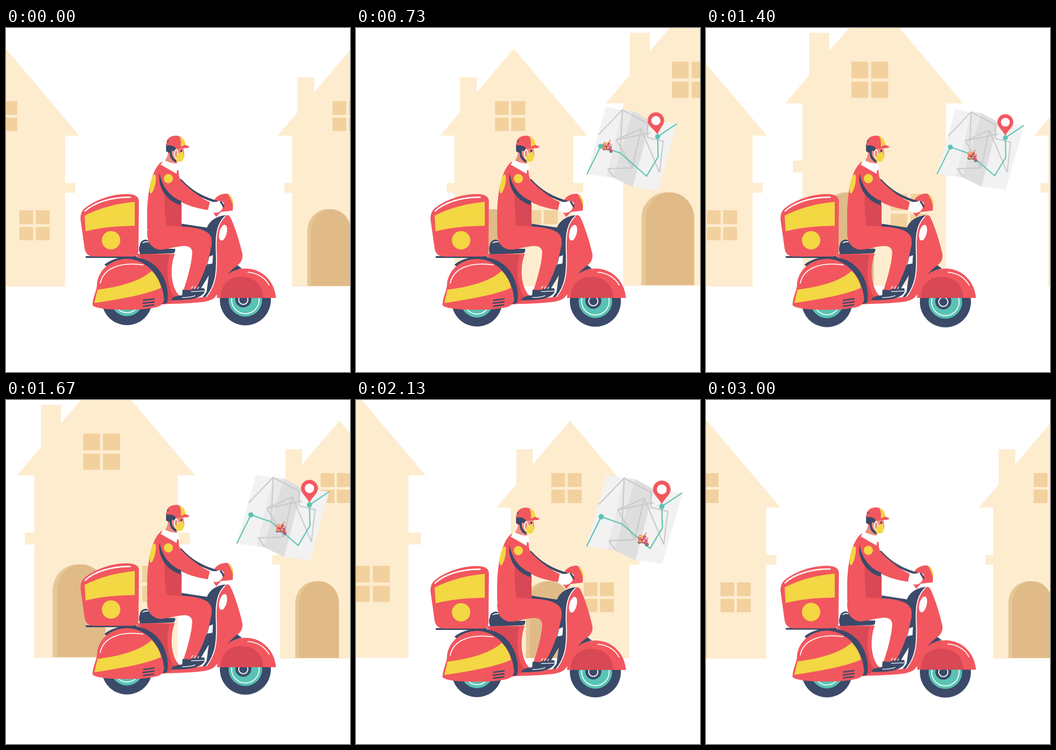
An HTML page without scripts for the animation above (3030 ms loop, 748 px wide and 748 px high).

```html
<!DOCTYPE html>
<html lang="en">
<head>
<meta charset="utf-8">
<title>Delivery rider</title>
<style>
  html, body { margin: 0; width: 100%; height: 100%; overflow: hidden; background: #fff; }
  svg { display: block; width: 100vw; height: 100vh; }

  .red { fill: #f2575f; }
  .deep { fill: #d94855; }
  .yellow { fill: #f3d743; }
  .navy { fill: #3b4a69; }
  .teal { fill: #58c3b4; }
  .skin { fill: #f08b80; }
  .white { fill: #fff; }
  .wall { fill: #feeccf; }
  .pane { fill: #f2d19e; }
  .line { fill: none; stroke: #fff; stroke-width: 2; stroke-linecap: round; }
  .bold { stroke-width: 3; }
  .thin { stroke-width: 1.6; }
  .ink { fill: none; stroke: #3b4a69; stroke-linecap: round; }
  .road { fill: none; stroke: #c9c9ca; stroke-width: 2.4; }
  .route { fill: none; stroke: #58c3b4; stroke-width: 2.4; }

  .street, .ride, .shake, .map, .pin, .courier {
    animation: 3030ms -5ms linear infinite;
  }
  .street { animation-name: street; }
  .ride { animation-name: bump; }
  .shake { animation-name: shake; }
  .map { animation-name: pulse; animation-timing-function: ease-in-out; transform-origin: 514px 308px; }
  .pin { animation-name: sway; transform-origin: 656px 232px; }
  .courier { animation-name: deliver; }

  @keyframes street {
    0% { transform: translateX(0); animation-timing-function: steps(89); }
    97.9%, 100% { transform: translateX(-1650px); }
  }
  @keyframes bump {
    0%, 33% { transform: translateY(0); }
    37.4% { transform: translateY(-.7px); }
    41%, 50% { transform: translateY(0); }
    54.5%, 55.5% { transform: translateY(-6px); }
    60%, 95% { transform: translateY(0); }
    100% { transform: translateY(-.7px); }
  }
  @keyframes shake {
    0% { transform: translateY(0); }
    9% { transform: translateY(2px); }
    16% { transform: translateY(0); }
    24.2% { transform: translateY(3px); }
    29% { transform: translateY(6px); }
    33% { transform: translateY(3px); }
    37.4% { transform: translateY(6px); }
    43% { transform: translateY(1px); }
    48% { transform: translateY(6px); }
    55% { transform: translateY(0); }
    62% { transform: translateY(6px); }
    70.4% { transform: translateY(0); }
    77% { transform: translateY(6px); }
    83.6% { transform: translateY(2px); }
    91% { transform: translateY(5px); }
    99% { transform: translateY(1.5px); }
    100% { transform: translateY(0); }
  }
  @keyframes pulse {
    0%, 13.2% { transform: scale(0); }
    17.6% { transform: scale(1.06); }
    24.2% { transform: scale(1); animation-timing-function: ease-out; }
    38% { transform: scale(.905); }
    55% { transform: scale(1.025); animation-timing-function: ease-out; }
    66% { transform: scale(1.07); animation-timing-function: ease-in; }
    70.4% { transform: scale(1.063); }
    83.6% { transform: scale(.925); }
    92.4% { transform: scale(.93); }
    96.8%, 100% { transform: scale(0); }
  }
  @keyframes sway {
    0%, 18% { transform: rotate(0); }
    24.2% { transform: rotate(-7deg); }
    30%, 100% { transform: rotate(0); }
  }
  @keyframes deliver {
    0%, 13.2% { transform: translate(535px, 250px); }
    24.2% { transform: translate(549px, 256px); }
    37.4% { transform: translate(569px, 267px); }
    55% { transform: translate(598px, 284px); }
    70.4% { transform: translate(620px, 302px); }
    83.6% { transform: translate(631px, 317px); }
    96.8%, 100% { transform: translate(645px, 294px); }
  }
</style>
</head>
<body>
<svg viewBox="0 0 748 748">
  <defs>
    <g id="window" class="pane">
      <path d="M0 0h30v30h-30zM35.500 0h30.500v30h-30.500zM0 36h30v29h-30zM35.500 36h30.500v29h-30.500z"/>
    </g>

    <!-- x = 0 is the roof ridge -->
    <g id="house">
      <path class="wall" d="M0 45L160 234H129V337H151V358H129V562H-129V358H-146V337H-129V234H-160L-117 183V107H-81V140Z"/>
      <use href="#window" x="-41" y="159"/>
      <use href="#window" x="29.500" y="396.500"/>
      <path fill="#e5c896" d="M-96 561V441A45 47 0 0 1 -51 394H-45V561Z"/>
      <path fill="#e0bb88" d="M-88 561V441A43.500 47 0 0 1 -1 441V561Z"/>
    </g>

    <g id="wheels">
      <circle class="navy" cx="263" cy="591" r="55"/>
      <circle class="teal" cx="263" cy="591" r="35.500"/>
      <circle class="line" cx="263" cy="591" r="28"/>
      <circle class="navy" cx="520.500" cy="591" r="55.500"/>
      <circle class="teal" cx="520.500" cy="591" r="36.500"/>
      <circle class="line" cx="520.500" cy="591" r="30"/>
      <circle class="navy" cx="516" cy="590" r="17.500"/>
      <circle class="line" cx="516" cy="591" r="10"/>
    </g>

    <g id="rider">
      <!-- frame behind the legs -->
      <path class="navy" d="M378 425L437 434C444 417 460 409 477 407L462 440L460 545C454 575 446 590 430 592L424 590L436 574L441 538L424 566L406 566L437 514L447 470L430 446L378 434Z"/>
      <path class="white" d="M442 497L450 494L449 512L438 514Z"/>
      <path class="navy" d="M476 545Q488 520 502 515L513 523Q490 527 476 545Z"/>

      <!-- floor and seat base -->
      <path class="red" d="M283 491H367C356 520 358 560 375 580C385 590 410 588 436 584L456 584Q446 594 425 596C390 600 360 599 325 602Z"/>
      <path class="deep" d="M290 493H356C346 525 352 568 366 585Q360 598 345 598Z"/>
      <path class="navy" d="M214 515C235 494 290 491 318 512C346 533 356 570 350 598L334 602Z"/>

      <!-- rear cowl -->
      <path class="red" d="M188 602C190 580 198 572 198 555C202 525 228 503 262 502C305 502 340 540 344 590Q343 600 333 605C310 614 250 614 218 611Q190 608 188 602Z"/>
      <path class="yellow" d="M199 569C245 563 290 552 317 528Q334 546 337 565C305 580 240 591 192 598Z"/>
      <path class="line" d="M205 555C211 524 245 508 298 515"/>
      <path class="ink" stroke-width="2.800" d="M299 592L322 589M298 598.500L322 595.500M299 605L321 602"/>

      <!-- seat -->
      <path class="navy" d="M291 472Q293 460 306 460L332 480H368Q369 490 361 490L292 492Q287 482 291 472Z"/>
      <path class="line" d="M298 467Q303 464 309 465"/>

      <!-- box -->
      <path class="ink" stroke-width="4" d="M175 498H283"/>
      <path class="red" d="M162 416Q161 402 170 393C195 372 233 361 262 361Q288 361 289 376L288 485Q287 497 275 497H190Q174 496 171 480Z"/>
      <path class="yellow" d="M171 408C205 390 245 381 280 378V430C240 431 210 433 173 442Z"/>
      <circle class="yellow" cx="228.500" cy="461.500" r="20"/>
      <path class="line bold" d="M172 398C192 379 232 367 270 368"/>

      <!-- front shield and fender -->
      <path class="red" d="M478 408C462 420 456 440 456 480C458 530 456 560 434 586L428 593C446 592 457 585 465 572L470 556C479 536 491 525 503 516Q516 507 514 491C508 465 498 432 488 412Q484 405 478 408Z"/>
      <path class="line" d="M476 410C461 424 456 445 457 480C460 535 455 560 436 584"/>
      <ellipse class="white" cx="472" cy="445" rx="8" ry="17.500" transform="rotate(14 472 445)"/>
      <path class="red" d="M459 587C460 548 485 523 522 523C560 524 584 553 587 587Z"/>
      <path class="deep" d="M467 587C466 556 486 541 512 541C542 541 560 562 559 587Z"/>
      <path class="line" d="M526 531Q558 534 572 559"/>

      <!-- handlebar -->
      <path class="red" d="M451 377Q458 362 478 360Q491 361 494 380L493 397L467 400L457 411L451 402Z"/>
      <path class="yellow" d="M483 362Q495 367 494 389Q491 374 483 362Z"/>

      <!-- legs and shoes -->
      <path class="red" d="M307 440C330 428 395 429 424 438Q450 446 447 468C441 510 426 545 411 571L386 570C396 540 404 510 405 488Q404 475 390 474C370 474 352 482 333 482Q305 476 307 440Z"/>
      <path class="navy" d="M360 592C361 584 373 582 383 581L384 569L401 570Q407 565 431 566Q434 573 429 578Q422 585 410 588Q395 592 360 592Z"/>
      <path class="line thin" d="M384 586Q402 586 411 582M403 573L431 572M403 566L406 562M410 567L412 562M417 567L419 563"/>

      <!-- jacket -->
      <path class="red" d="M338 291C318 306 308 352 307 400V437Q312 446 325 438L382 432L381 375L375 309Z"/>
      <path class="deep" d="M345 362Q360 378 382 384L381 432L349 430Q344 398 345 362Z"/>
      <ellipse class="yellow" cx="319" cy="339" rx="5.500" ry="21" transform="rotate(12 319 339)"/>
      <path class="ink" stroke-width="5" d="M380 331C400 353 425 370 466 380"/>
      <path class="red" d="M340 303C360 297 375 313 379 330C400 353 426 371 446 380L440 396C412 392 388 384 372 373C350 358 333 330 340 303Z"/>
      <path class="navy" d="M334 316C339 344 356 367 381 376L380 385C348 376 329 345 334 316Z"/>
      <circle class="yellow" cx="353" cy="327.500" r="10"/>

      <!-- glove -->
      <path class="white" d="M439 396L443 379L457 378Q468 373 474 381L470 394Q463 403 454 402Z"/>
      <path class="ink" stroke-width="4" d="M467 378Q471 383 473 388"/>

      <!-- head -->
      <path class="skin" d="M352 266L386 260L388 278L372 292L371 299L345 289Q353 280 352 266Z"/>
      <path class="navy" d="M348 252L372 258L366 268L361 266Q358 280 371 288L370 293Q356 286 356 272L348 268Z"/>
      <path class="white" d="M344 287L336 297L371 317L372 309L378 309L374 295Q358 295 344 287Z"/>
      <path class="yellow" d="M372 274L384 269L388 280L383 290L371 291L369 283Z"/>
      <path class="line" d="M374 275Q373 262 368 266Q363 274 370 285"/>
      <ellipse cx="381" cy="267" rx="1.700" ry="2.500" fill="#222a40"/>
      <path class="red" d="M349 256Q347 235 370 234Q387 235 390 254L399 258Q397 262 386 261L371 263Q362 252 349 256Z"/>
      <path class="yellow" d="M377 236Q389 239 390 254L380 258Q382 245 377 236Z"/>
      <circle class="navy" cx="352" cy="246" r="1.800"/>
    </g>
  </defs>

  <g class="street">
    <use href="#house" x="-0.500"/>
    <use href="#house" x="751"/>
    <use href="#house" transform="translate(1144.500 -119) scale(1.209)"/>
    <use href="#house" x="1652"/>
    <use href="#house" x="2403.500"/>
  </g>

  <g class="ride">
    <g class="shake"><use href="#wheels"/></g>
    <use href="#rider"/>

    <g class="map">
      <path fill="#f2f2f2" d="M543 172L579 178L602 180L640 201L698 208L657 353L602 346L559 325L502 318Z"/>
      <path fill="#dedede" d="M602 180L640 201L602 346L559 325Z"/>
      <path fill="#e9e9e9" d="M579 178L602 180L559 325L545 323Z"/>
      <path class="road" d="M527 232L579 178L575 271M579 178L634 207V238L668 246L660 314M566 243L620 219L660 314M566 243L601 304L548 306L561 325M566 243L640 228M601 304L620 219"/>
      <path class="route" d="M502 318L532 257L575 272L632 322L657 280L656 236L698 208"/>
      <circle class="teal" cx="532" cy="257" r="5.500"/>
      <circle class="teal" cx="656" cy="236" r="5.500"/>
      <g class="pin">
        <path class="red" d="M656 232C652 221 638 212 638 201A18 18 0 0 1 674 201C674 212 660 221 656 232Z"/>
        <circle class="white" cx="656" cy="201" r="10"/>
      </g>
      <g class="courier">
        <g transform="rotate(20) scale(.062) translate(-375 -440)">
          <use href="#wheels"/>
          <use href="#rider"/>
        </g>
      </g>
    </g>
  </g>
</svg>
</body>
</html>
```
